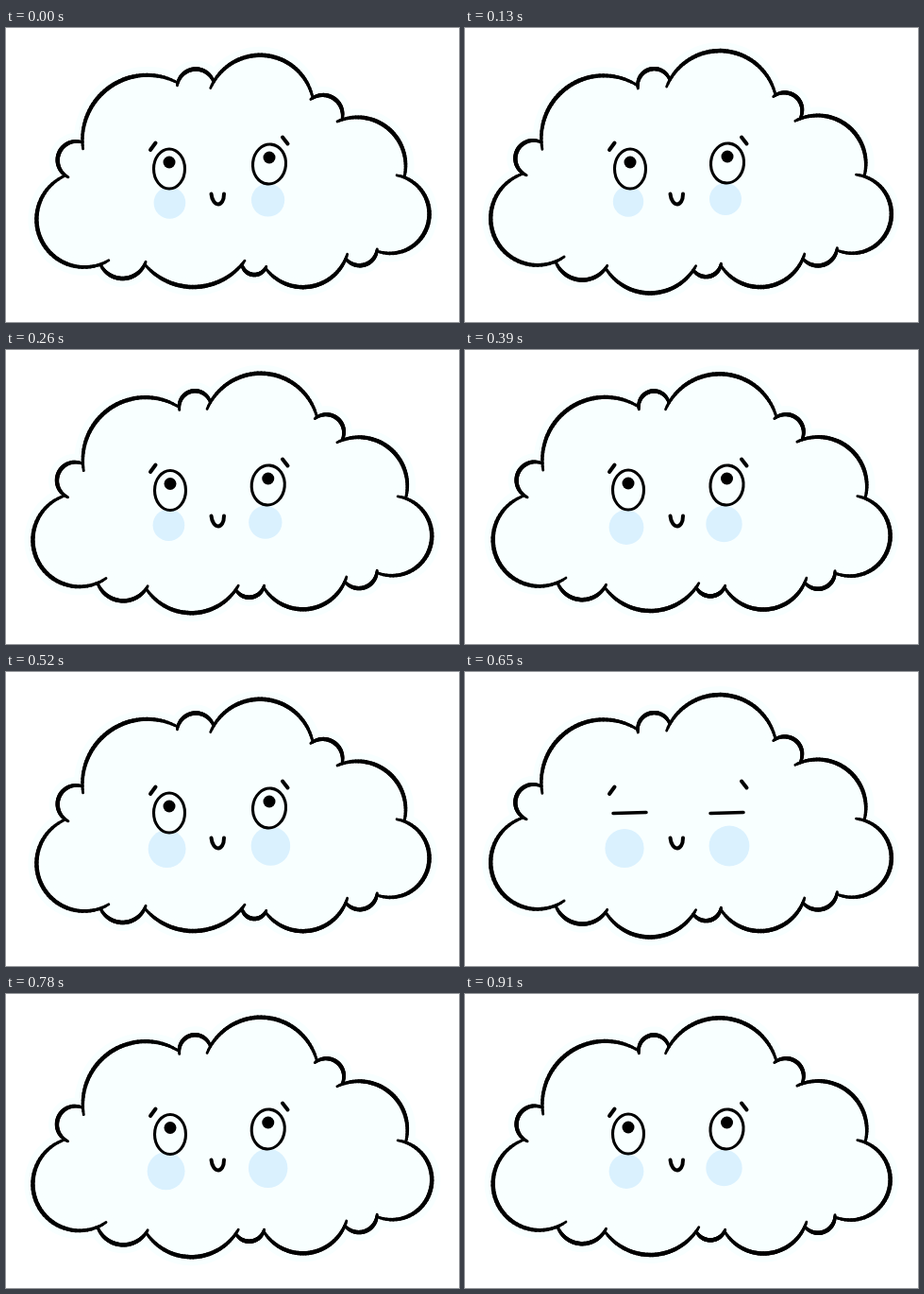
Animation of 480x311 px, one loop 1.04 s. Source, as an HTML page with a canvas:

```html
<!DOCTYPE html>
<html lang="en">
<head>
<meta charset="utf-8">
<title>Cloud</title>
<style>
html, body { margin: 0; width: 100%; height: 100%; overflow: hidden; background: #fff; }
canvas { display: block; }
</style>
</head>
<body>
<canvas width="480" height="311"></canvas>
<script>
const ctx = document.querySelector('canvas').getContext('2d');
const STEP = 130, STEPS = 8, BLINK = 5;
const INK = '#000', PALE = '#f8ffff', BLUSH = '#daf1fe';

// How far each lobe bulges out, clockwise from the upper left.
const BULGES = [34.5, 14, 36.5, 13, 26.5, 41, 11, 25, 9, 24, 15, 49, 17];

// Joints are the points where one lobe ends and the next begins.
const parse = text => text.split(' ').map(p => p.split(',').map(Number));
const low = {
  joints: parse('81,121 182,58 220,57 325,74 356,97 422,158 393,236 360,244 275,254 250,250 147,250 100,250 63,156'),
  eyes: [[173, 149], [279, 144]], cheeks: [[172, 186], [279, 183]], swell: 1
};
const wide = {
  joints: parse('81,121 183,61 217,55 329,71 355,96 423,157 394,235 358,244 271,251 242,256 149,254 96,247 62,154'),
  eyes: [[175, 149], [278, 143]], cheeks: [[171, 185], [278, 182.5]], swell: 1.06
};
const round = {
  joints: parse('82,120 184,60 216,56 330,71 357,95 424,157 392,236 360,246 275,251 245,251 148,251 98,246 63,154'),
  eyes: [[173, 148], [277.5, 143]], cheeks: [[171, 187.5], [274.5, 184]], swell: 1.04
};

const blend = (a, b) => Array.isArray(a) ? a.map((v, i) => blend(v, b[i])) : (a + b) / 2;
const between = {};
for (const key in wide) between[key] = blend(wide[key], round[key]);
const poses = [low, wide, between, round];

// Circular arc from a to b, with a short tail before its start.
function lobe([ax, ay], [bx, by], bulge) {
  const dx = bx - ax, dy = by - ay, chord = Math.hypot(dx, dy);
  const radius = (chord * chord / 4 + bulge * bulge) / (2 * bulge);
  const shift = (bulge - radius) / chord;
  const cx = (ax + bx) / 2 + dy * shift, cy = (ay + by) / 2 - dx * shift;
  const from = Math.atan2(ay - cy, ax - cx), tail = 0.2 * bulge / radius;
  const sweep = 4 * Math.atan(2 * bulge / chord) + tail;
  return Array.from({ length: 41 }, (_, i) => {
    const angle = from - tail + sweep * i / 40;
    return [cx + radius * Math.cos(angle), cy + radius * Math.sin(angle)];
  });
}
for (const pose of poses)
  pose.lobes = BULGES.map((bulge, i) =>
    lobe(pose.joints[i], pose.joints[(i + 1) % BULGES.length], bulge * pose.swell));

function line(x1, y1, x2, y2, width) {
  ctx.lineWidth = width;
  ctx.beginPath();
  ctx.moveTo(x1, y1);
  ctx.lineTo(x2, y2);
  ctx.stroke();
}
function oval(x, y, rx, ry, fill, tilt = 0) {
  ctx.beginPath();
  ctx.ellipse(x, y, rx, ry, tilt, 0, 2 * Math.PI);
  ctx.fillStyle = fill;
  ctx.fill();
}

function drawCloud(lobes) {
  ctx.beginPath();
  lobes.flat().forEach(p => ctx.lineTo(...p));
  ctx.closePath();
  ctx.fillStyle = ctx.strokeStyle = PALE;
  ctx.lineWidth = 18;
  ctx.fill();
  ctx.stroke();
  ctx.strokeStyle = INK;
  for (const points of lobes)
    for (let i = 1; i < points.length; i++) {
      const taper = Math.sqrt(Math.sin(Math.PI * i / points.length));
      line(...points[i - 1], ...points[i], 2.2 + 2.3 * taper);
    }
}

function drawEye(x, y, side, blink) {
  if (blink) return line(x - 18, 149.5, x + 17, 148.5, 3.5);
  oval(x, y, 17 + side / 2, 21, PALE, side > 0 ? 0.1 : 0);
  ctx.lineWidth = 3.1;
  ctx.stroke();
  oval(x, y - 7, 6.5, 6.5, INK);
}

function drawMouth() {
  ctx.lineWidth = 4;
  ctx.beginPath();
  ctx.moveTo(217.5, 175.5);
  ctx.bezierCurveTo(219, 190, 231, 190, 231, 175.5);
  ctx.stroke();
}

function draw(now) {
  const step = Math.floor(now / STEP) % STEPS;
  const pulse = Math.cos((step - BLINK) * 2 * Math.PI / STEPS);
  const { lobes, eyes, cheeks } = poses[step % poses.length];
  ctx.fillStyle = '#fff';
  ctx.fillRect(0, 0, 480, 311);
  ctx.lineCap = ctx.lineJoin = 'round';
  drawCloud(lobes);
  [-1, 1].forEach((side, i) => {
    const [x, y] = cheeks[i], r = 18.8 + side * 0.4 + 2.2 * pulse;
    oval(x + 2 * side * pulse, y + 1.5 * pulse, r, r, BLUSH);
    drawEye(...eyes[i], side, step === BLINK);
  });
  line(153, 129, 158.5, 121.5, 4);
  line(293, 115.5, 298.5, 122.5, 4);
  drawMouth();
}

const start = performance.now();
function tick() {
  draw(performance.now() - start);
  requestAnimationFrame(tick);
}
tick();
</script>
</body>
</html>
```
